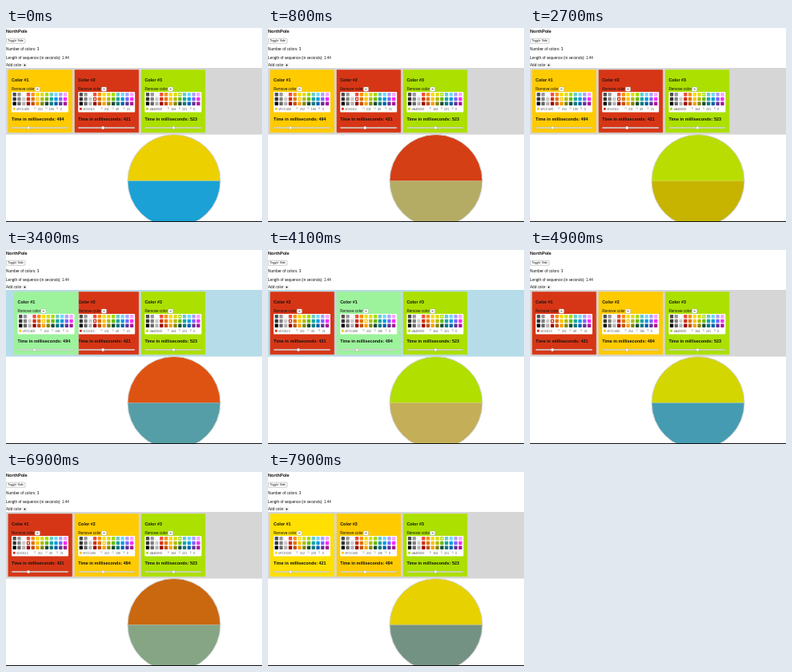
An HTML page with a canvas for the animation above (8000 ms loop, 320 by 243 pixels).

```html
<!DOCTYPE html>
<html lang="en">
<head>
<meta charset="utf-8">
<title>Color sequence</title>
<style>
html, body { margin: 0; width: 100%; height: 100%; overflow: hidden; background: #fff; }
canvas { display: block; width: 320px; height: 243px; }
</style>
</head>
<body>
<canvas id="stage"></canvas>
<script>
const W = 320, H = 243, LOOP = 8000;
const LIFT = 3200, DROP = 4329, RECOLOR = 7384;
const SLOT = 83.2, LEFT = 2.3;
const FONT = '"Liberation Sans", Arial, sans-serif';
const canvas = document.getElementById('stage');
const ctx = canvas.getContext('2d');
const dpr = window.devicePixelRatio || 1;
canvas.width = W * dpr;
canvas.height = H * dpr;

const PALETTE = [
  '4D4D4D 999999 FFFFFF F44E3B FE9200 FCDC00 DBDF00 A4DD00 68CCCA 73D8FF AEA1FF FDA1FF',
  '333333 808080 CCCCCC D33115 E27300 FCC400 B0BC00 68BC00 16A5A5 009CE0 7B64FF FA28FF',
  '000000 666666 B3B3B3 9F0500 C45100 FB9E00 808900 194D33 0C797D 0062B1 653294 AB149E'
].map(row => row.split(' '));

// hex is the label, paint the colour as displayed
const yellow = { hex: 'FCC400', paint: 'FFCB00', ms: 494 };
const red = { hex: 'D33115', paint: 'D73616', ms: 421 };
const green = { hex: 'A4DD00', paint: 'ACE000', ms: 523 };
const lemon = { hex: 'FCDC00', paint: 'FFE000', ms: 421 };

// Slider thumb offset of each card
const THUMBS = [21, 31, 36];

// Lower half: time within its cycle, colour
const LOWER_CYCLE = 1598;
const LOWER = [[0, '1BA1D6'], [106, '459CB2'], [904, 'C4AE58'], [1102, 'C6B400'],
  [1206, 'BFC400'], [1500, '7D917B'], [LOWER_CYCLE, '1BA1D6']];

const clamp = v => Math.max(0, Math.min(1, v));
const smooth = v => { v = clamp(v); return v * v * (3 - 2 * v); };
const rgb = hex => [0, 2, 4].map(i => parseInt(hex.slice(i, i + 2), 16));

function mix(a, b, k) {
  const to = rgb(b);
  return `rgb(${rgb(a).map((v, i) => Math.round(v + (to[i] - v) * k))})`;
}

// CSS "ease": cubic-bezier(.25, .1, .25, 1)
function ease(x) {
  let lo = 0, hi = 1;
  const curve = (s, a, b) => 3 * (1 - s) * (1 - s) * s * a + 3 * (1 - s) * s * s * b + s * s * s;
  for (let i = 0; i < 20; i++) {
    const mid = (lo + hi) / 2;
    if (curve(mid, 0.25, 0.25) < x) lo = mid; else hi = mid;
  }
  return curve(lo, 0.1, 1);
}

function upperColor(cards, time) {
  const total = cards.reduce((sum, c) => sum + c.ms, 0);
  let left = time % total, i = 0;
  while (left >= cards[i].ms) left -= cards[i++].ms;
  return mix(cards[i].paint, cards[(i + 1) % cards.length].paint, ease(left / cards[i].ms));
}

function lowerColor(time) {
  const p = time % LOWER_CYCLE;
  const i = LOWER.findIndex(stop => stop[0] > p);
  const [t0, a] = LOWER[i - 1], [t1, b] = LOWER[i];
  return mix(a, b, (p - t0) / (t1 - t0));
}

function rect(x, y, w, h, fill) {
  ctx.fillStyle = fill;
  ctx.fillRect(x, y, w, h);
}

function round(x, y, w, h, r, fill, stroke) {
  ctx.beginPath();
  ctx.roundRect(x, y, w, h, r);
  ctx.fillStyle = fill;
  ctx.fill();
  if (stroke) {
    ctx.lineWidth = 0.5;
    ctx.strokeStyle = stroke;
    ctx.stroke();
  }
}

function dot(x, y, r, fill) {
  ctx.beginPath();
  ctx.arc(x, y, r, 0, Math.PI * 2);
  ctx.fillStyle = fill;
  ctx.fill();
}

function text(str, x, y, size, bold, fill = '#111') {
  ctx.font = `${bold ? 'bold ' : ''}${size}px ${FONT}`;
  ctx.fillStyle = fill;
  ctx.fillText(str, x, y);
}

function picker(x, hex) {
  round(x, 79.9, 71, 25.6, 1, '#fff');
  PALETTE.forEach((row, r) => row.forEach((c, i) => {
    const sx = x + 1.5 + i * 5.76, sy = 81.1 + r * 5.75;
    round(sx, sy, 4.3, 4.3, 0.6, '#' + c, c === 'FFFFFF' ? '#ddd' : null);
    if (c === hex) dot(sx + 2.15, sy + 2.15, 1.1, '#fff');
  }));
  rect(x + 1.8, 99.9, 2.8, 2.8, '#' + hex);
  text('#' + hex, x + 6, 101.5, 3.7, false, '#555');
  rgb(hex).forEach((v, i) => {
    text('RGB'[i], x + 28.3 + i * 14, 101.5, 3.2, false, '#999');
    text(v, x + 32.8 + i * 14, 101.5, 3.7, false, '#555');
  });
}

function card(x, number, { hex, paint, ms }, thumb, fill = '#' + paint) {
  round(x, 52, 80.8, 79.2, 1, fill, '#D3D3D3');
  const px = x + 4.7;
  text('Color #' + number, px, 65.3, 5.4, true);
  text('Remove color', px, 76.5, 4.65);
  round(px + 29.2, 74, 6.2, 5.2, 0.8, '#fff', '#aaa');
  rect(px + 31.2, 76.2, 2.2, 0.7, '#111');
  picker(px, hex);
  text('Time in milliseconds: ' + ms, px, 114.3, 5.43, true);
  round(px, 124.2, 71, 1.6, 0.8, '#e6e6e6', 'rgba(130,130,130,.45)');
  dot(px + thumb, 125, 2, '#999');
  dot(px + thumb, 125, 1.7, '#f5f5f5');
}

function header() {
  text('NorthPole', 0, 4.7, 5.6, true);
  round(0.3, 13.2, 23.6, 6, 0.8, '#fff', '#999');
  text('Toggle Side', 2.3, 16.3, 3.75);
  text('Number of colors: 3', 0, 26.6, 4.75);
  text('Length of sequence (in seconds): 1.44', 0, 37.5, 4.65);
  text('Add color', 0, 46.6, 4.65);
  round(21, 44.3, 4.9, 4.6, 0.8, '#fff', '#ccc');
  rect(22.2, 46.2, 2.4, 0.8, '#111');
  rect(23, 45.4, 0.8, 2.4, '#111');
}

function board(cards, time) {
  const dragging = time >= LIFT && time < DROP;
  rect(0, 50, W, 83.5, dragging ? '#B5DCE8' : '#D6D6D6');
  const moved = dragging ? smooth((time - LIFT - 80) / 650) : 0;
  const yielded = dragging ? smooth((time - LIFT - 370) / 220) : 0;
  const place = i => LEFT + SLOT * i;
  card(place(2), 3, cards[2], THUMBS[2]);
  card(place(1 - yielded), 2, cards[1], THUMBS[1]);
  card(place(moved), 1, cards[0], THUMBS[0], dragging ? '#9CF39C' : undefined);
}

function wheel(upper, lower) {
  const x = 210, y = 191.5, r = 58;
  for (const [fill, flip] of [[upper, true], [lower, false]]) {
    ctx.beginPath();
    ctx.arc(x, y, r, 0, Math.PI, flip);
    ctx.fillStyle = fill;
    ctx.fill();
  }
  ctx.beginPath();
  ctx.arc(x, y, r, 0, Math.PI * 2);
  ctx.lineWidth = 1;
  ctx.strokeStyle = '#d3d3d3';
  ctx.stroke();
}

function draw(time) {
  let cards = [yellow, red, green], start = -1161;
  if (time >= RECOLOR) {
    cards = [lemon, yellow, green];
    start = RECOLOR;
  } else if (time >= DROP) {
    cards = [red, yellow, green];
    start = DROP;
  }
  ctx.setTransform(dpr, 0, 0, dpr, 0, 0);
  ctx.textBaseline = 'middle';
  rect(0, 0, W, H, '#fff');
  header();
  board(cards, time);
  wheel(upperColor(cards, time - start), lowerColor(time));
  rect(0, 242, W, 1, '#111');
}

const begin = performance.now();
function tick() {
  draw((performance.now() - begin) % LOOP);
  requestAnimationFrame(tick);
}
tick();
</script>
</body>
</html>
```
